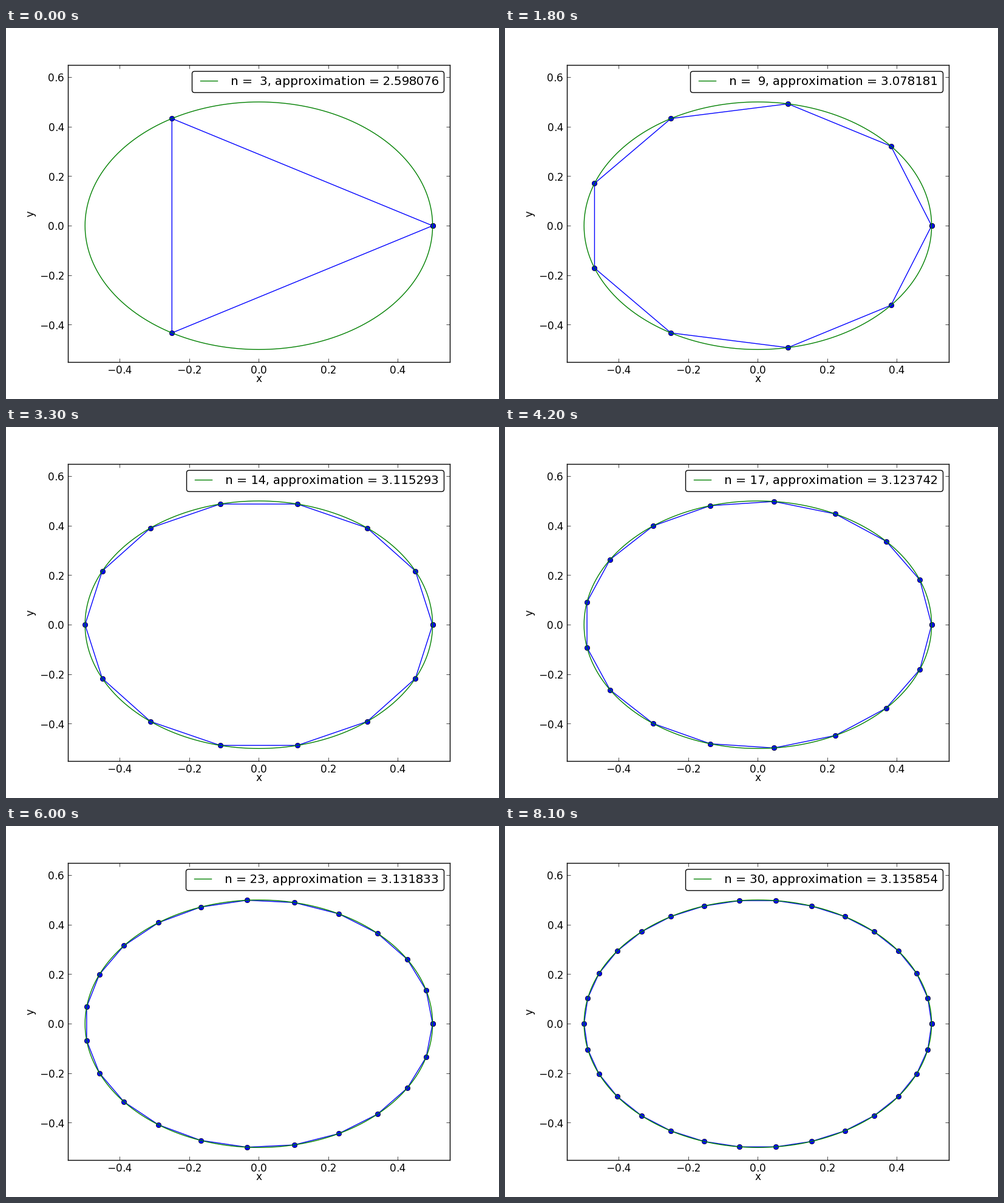
A matplotlib script for the animation above (8.4 s loop, 812x612 px).

```python
import numpy as np
import matplotlib.pyplot as plt
from matplotlib.animation import FuncAnimation

W, H, DPI = 812, 612, 100
RADIUS = 0.5
FIRST_N, LAST_N = 3, 30

plt.rcParams.update({
    "font.family": "DejaVu Sans",
    "font.size": 12,
    "text.hinting": "force_autohint",
    "text.hinting_factor": 1,
    "text.kerning_factor": 6,
    "axes.linewidth": 1.0,
    "lines.linewidth": 1.0,
    "patch.linewidth": 1.0,
})


def ring(count):
    """Closed loop of evenly spaced points on the circle."""
    angle = np.linspace(0, 2 * np.pi, count + 1)
    return RADIUS * np.cos(angle), RADIUS * np.sin(angle)


def caption(n):
    return f"n = {n:2d}, approximation = {n * np.sin(np.pi / n):.6f}"


# The tiny margin keeps the pixel size from being truncated downwards.
fig = plt.figure(figsize=((W + 0.01) / DPI, (H + 0.01) / DPI), dpi=DPI,
                 facecolor="white")
left, right, bottom, top = 101.5625, 731.25, 61.25, 551.25
ax = fig.add_axes([left / W, bottom / H, (right - left) / W, (top - bottom) / H])
ax.set_xlim(-0.55, 0.55)
ax.set_ylim(-0.55, 0.65)
ax.set_xticks([-0.4, -0.2, 0.0, 0.2, 0.4])
ax.set_yticks([-0.4, -0.2, 0.0, 0.2, 0.4, 0.6])
ax.tick_params(direction="in", top=True, right=True, length=4, width=0.5, pad=4)

fig.text((left + right) / 2 / W, (H - 584) / H, "x", ha="center", va="baseline")
fig.text(50 / W, (bottom + top) / 2 / H, "y", rotation=90, ha="right", va="center")

polygon, = ax.plot(*ring(FIRST_N), color="blue", marker="o", markersize=6,
                   markeredgecolor="black", markeredgewidth=0.5)
circle, = ax.plot(*ring(400), color="green", label=caption(FIRST_N))

legend = ax.legend(loc="upper right", fontsize=14.4, numpoints=2, fancybox=True,
                   framealpha=1, edgecolor="black", borderpad=0.4,
                   handlelength=2, handletextpad=0.8, borderaxespad=0.5)
label = legend.get_texts()[0]


def update(i):
    n = FIRST_N + i
    polygon.set_data(*ring(n))
    label.set_text(caption(n))
    return polygon, label


anim = FuncAnimation(fig, update, frames=LAST_N - FIRST_N + 1, interval=300,
                     repeat=True, blit=False)
plt.show()
```
